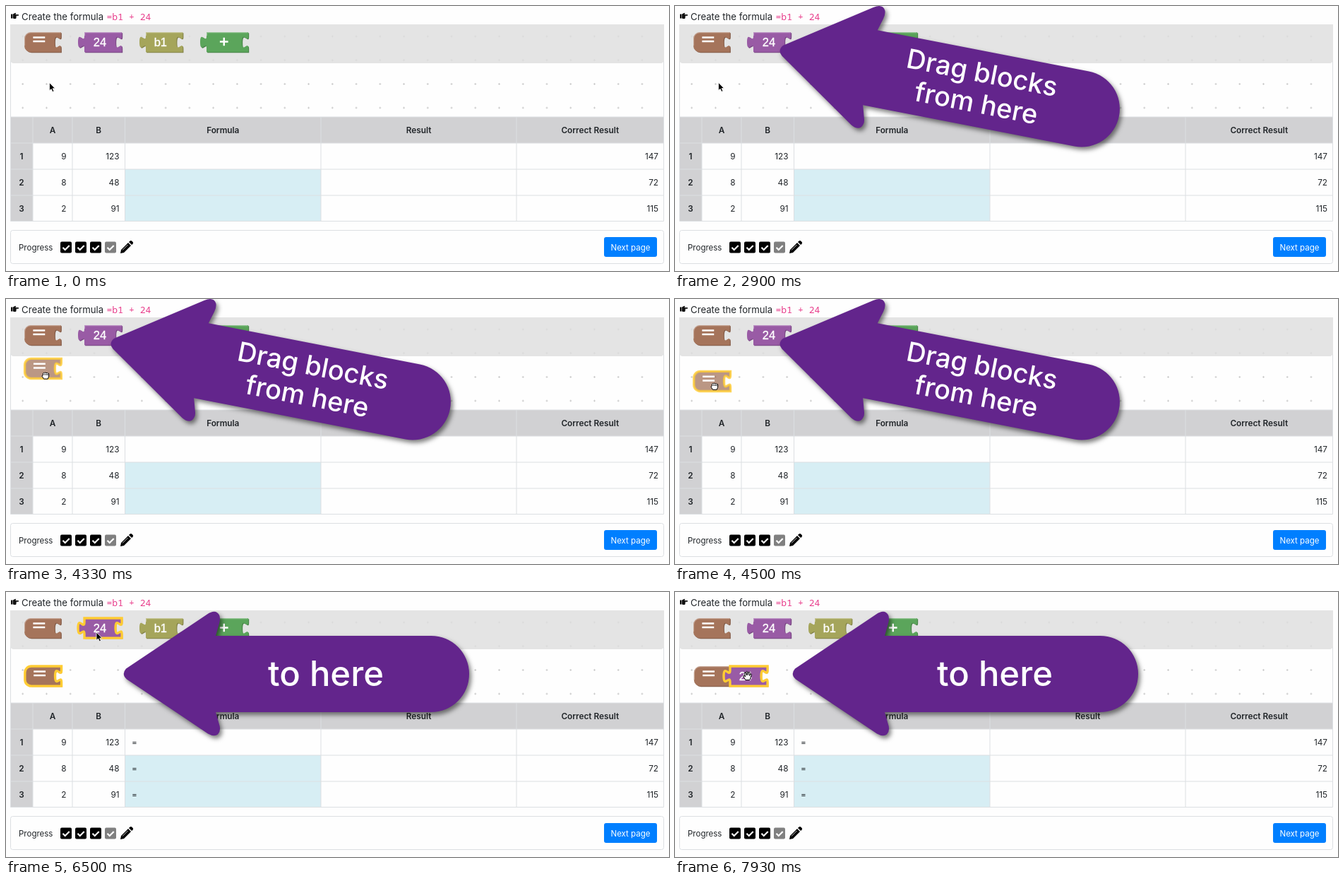
Recreate the animation shown at these times as an HTML page. Size 939 by 375 pixels, loop 8 s.

```html
<!DOCTYPE html>
<html lang="en">
<head>
<meta charset="utf-8">
<style>
  html, body { margin: 0; width: 100%; height: 100%; overflow: hidden; background: #fefefe; }
  svg { display: block; font: 11.8px Inter, sans-serif; fill: #212529; }
  .bold { font-weight: 600; }
  .mid { text-anchor: middle; }
  .end { text-anchor: end; }
  .line { fill: none; stroke: #dcdfe2; }
  .label { font: 14.67px "Liberation Sans", Arial, sans-serif; fill: #fff; stroke: #fff; stroke-width: .3; text-anchor: middle; }
  .glyph { stroke: #fff; stroke-width: 2.2; }
  .light { fill: none; stroke: #fff; stroke-opacity: .35; }
  .sel .face { stroke: #fc3; stroke-width: 3; }
  .sel .light, .drag .light, .drag .dark { display: none; }
  .drag .face { fill-opacity: .75; stroke-opacity: .8; }
  .arrow { filter: drop-shadow(3px 4px 3px rgba(0, 0, 0, .5)); }
  .arrow path { fill: #63258c; }
  .arrow text { fill: #fff; font-weight: 500; text-anchor: middle; }
  .hand { fill: #fff; stroke: #000; stroke-linejoin: round; }
</style>
</head>
<body>
<svg id="stage" width="939" height="375" viewBox="0 0 939 375"></svg>
<script>
const text = (x, y, content, cls = '', extra = '') =>
  `<text x="${x}" y="${y}" class="${cls}" ${extra}>${content}</text>`;
const rect = (x, y, w, h, fill, extra = '') =>
  `<rect x="${x}" y="${y}" width="${w}" height="${h}" fill="${fill}" ${extra}/>`;

// Puzzle blocks, in units of 1/1.125 px
const blocks = {
  equals: { x: 26, w: 46, fill: '#a5745b', dark: '#845d49', round: true,
    label: '<path class="glyph" d="M11 6.6h15M11 11.6h15"/>' },
  number: { x: 111, w: 47.2, fill: '#995ba5', dark: '#7a4984',
    label: text(19.5, 17.5, '24', 'label') },
  cell: { x: 198, w: 46.5, fill: '#a5a55b', dark: '#848449',
    label: text(18.5, 17.5, 'b1', 'label') },
  plus: { x: 284, w: 52.5, fill: '#5ba55b', dark: '#498449',
    label: '<path class="glyph" d="M16.8 12h10.4M22 6.8v10.4"/>' },
};

function block(name, id) {
  const { w, fill, dark, round, label } = blocks[name];
  const left = round
    ? 'H8 a8 8 0 0 1 -8 -8 V8 a8 8 0 0 1 8 -8 Z'
    : 'H0 V20 c0,-10 -8,8 -8,-7.5 s8,2.5 8,-7.5 Z';
  const d = `M${round ? 8 : 0},0 H${w} v5 c0,10 -8,-8 -8,7.5 s8,-2.5 8,7.5 V25 ${left}`;
  return `<g id="${id}"><path class="dark" d="${d}" fill="${dark}" transform="translate(1 1)"/>
    <path class="face" d="${d}" fill="${fill}"/>
    <path class="light" d="M.5 ${round ? 17 : 4.5} V${round ? 8 : .5} ${round ? 'a7.5 7.5 0 0 1 7.5 -7.5' : ''} H${w - .5}"/>
    ${label}</g>`;
}

// Pointer callout with its tip at the origin
const callout = (id, place, labels) => `<g id="${id}" class="arrow"><g transform="${place}">
  <path d="M3-7 L118-84 Q130-92 135-83 Q137-78 135-71 L130-53.5 H435 a54 54 0 0 1 0 108 H130
    L135 72 Q138 80 133 86 Q128 90 119 85 L4 8 Q-4 1 3-7Z"/>${labels}</g></g>`;

function table() {
  const cols = [6.5, 38, 94, 168.5, 446, 723, 931.5], rows = [157, 194, 231, 268, 304.5];
  const data = [[9, 123, 147], [8, 48, 72], [2, 91, 115]];
  let out = rect(6.5, 157, 925, 37, '#d1d1d3') + rect(6.5, 194, 31.5, 110.5, '#d1d1d3')
    + rect(168.5, 231, 277.5, 73.5, '#d7eef4');
  out += `<path class="line" d="${cols.map(x => `M${x} 157V304.5`).join('')}${rows.map(y => `M6.5 ${y}H931.5`).join('')}"/>`;
  ['A', 'B', 'Formula', 'Result', 'Correct Result'].forEach((name, i) =>
    out += text((cols[i + 1] + cols[i + 2]) / 2, 180, name, 'bold mid'));
  data.forEach((row, i) => {
    const y = 217.3 + 37 * i;
    out += text(22, y, i + 1, 'bold mid');
    row.forEach((value, j) => out += text([85.5, 160.5, 924][j], y, value, 'end'));
  });
  return out + `<g id="formulas">${data.map((_, i) => text(178, 217.3 + 37 * i, '=')).join('')}</g>`;
}

function footer() {
  let out = rect(6.5, 317.5, 925, 47, 'none', 'rx="3" stroke="#dcdfe2"')
    + text(18, 346, 'Progress', '', 'font-size="11.5"');
  for (let i = 0; i < 4; i++)
    out += `<g transform="translate(${77 + 21 * i} 333.5)">${rect(0, 0, 16, 16, i < 3 ? '#000' : '#808080', 'rx="2"')}
      <path d="M3.5 8.3l3.2 3.2 6-6" fill="none" stroke="#fff" stroke-width="2.2"/></g>`;
  return out + `<path d="M162 350l1-5 10-10 4 4-10 10zM174 334l1.5-1.5q1.5-1 2.8 0l1.3 1.4q1.2 1.4 0 2.7l-1.5 1.5z" fill="#000"/>
    <path d="M165 345.5l7.5-7.5" stroke="#fefefe" stroke-width=".8"/>`
    + rect(847, 327, 75, 28, '#007fff', 'rx="3"')
    + text(884.5, 345.5, 'Next page', 'mid', 'font-size="11.5" style="fill:#fff"');
}

let grid = '';
for (let y = 0; y < 4; y++)
  for (let x = 0; x < 27; x++)
    grid += `M${22.2 + 33.74 * x} ${43 + 33.7 * y}h3m-1.5-1.5v3`;

const palette = Object.keys(blocks).map(name => block(name, name)).join('');

document.getElementById('stage').innerHTML = `
  <path d="M7 11.5h2.5v6H7zM10 11.5l3-1.8 1.2.6-.8 1.6h4.2q1 .9 0 1.8h-3.2q1 .7.1 1.5.7.8-.2 1.5.4.8-.6 1.3H11l-1-.7z" fill="#111"/>
  ${text(22, 19.5, 'Create the formula', '', 'font-size="13.2"')}
  <text x="142.5" y="19.5" style="font:13.1px 'Noto Sans Mono',monospace;fill:#e83e8c">=b1 + 24</text>
  <path class="line" d="M6.5 26V157M931.5 26V157"/>
  <path d="M6 26H932V75q0 6-6 6H12q-6 0-6-6Z" fill="#e4e4e4"/>
  <path d="${grid}" stroke="#bbb" stroke-opacity=".75" stroke-width=".9"/>
  <path d="M6 26H932V75q0 6-6 6H12q-6 0-6-6Z" fill="#e4e4e4" fill-opacity=".7"/>
  ${table()}${footer()}${palette}
  ${block('equals', 'equalsCopy')}${block('number', 'numberCopy')}
  <g id="cursor">
    <path id="pointer" d="M0 0V11.3L2.6 9 4.4 13 6.4 12.1 4.7 8.2H8Z" fill="#000" stroke="#fff" stroke-width=".8"/>
    <path id="open" class="hand" d="M-2.5 9.5 L-5.5 5 q-.6-1.8 1-1.6 l1.7 1.5 -1.6-5 q.4-1.8 1.9-.7 l1.3 3.5 -.5-4.6 q1-1.5 2 0 l.4 4.4 1-4 q1.4-1 1.9.4 l-.6 4.6 1.3-2.4 q1.6-.6 1.5 1 l-1.5 4.9 -1 2.5Z"/>
    <path id="closed" class="hand" d="M-2.5 9.3 L-4.8 5.6 q-.3-2 1.6-1.8 l-.4-2.3 q.8-1.8 2.3-.5 .9-1.7 2.3 0 1.5-1.1 2.2.4 1.8-.5 1.7 1.3 l-.4 3.5 -1.3 3.1Z M-1 2v2M1.2 2v2M3.2 2.2v2"/>
  </g>
  ${callout('dragHint', 'translate(149 62) rotate(11)',
    text(287, -9.4, 'Drag blocks', '', 'font-size="38"') + text(287, 34.4, 'from here', '', 'font-size="38"'))}
  ${callout('dropHint', 'translate(167 115.5)', text(286, 17.5, 'to here', '', 'font-size="49"'))}`;

const $ = id => document.getElementById(id);
const show = (id, on) => $(id).style.display = on ? '' : 'none';
const mark = (id, cls, on) => $(id).classList.toggle(cls, on);
const place = (id, x, y) => $(id).setAttribute('transform', `translate(${x} ${y}) scale(1.125)`);

function ease(t, from, to) {
  const p = Math.min(1, Math.max(0, (t - from) / (to - from)));
  return p * p * (3 - 2 * p);
}

for (const name in blocks) place(name, blocks[name].x, 37);

const DRAG1 = 3860, DROP1 = 5200, DRAG2 = 6730, DROP2 = 7900, LAG = 33;
const carry1 = t => ease(t, DRAG1, 4550);
const carry2 = t => ease(t, DRAG2, 7530);

function cursorAt(t) {
  const mix = (a, b, p) => a.map((v, i) => v + (b[i] - v) * p);
  const rest = [61.5, 108.5], onEquals = [56, 52], dropped = [56, 120], onNumber = [128, 57];
  if (t < 2900) return mix(rest, onEquals, ease(t, 1400, 1900));
  if (t < DRAG1) return mix(rest, onEquals, ease(t, 2880, 3480));
  if (t < 5700) return mix(onEquals, dropped, carry1(t));
  if (t < DRAG2) return mix(dropped, onNumber, ease(t, 5700, 6480));
  return mix(onNumber, [102.5, 115], carry2(t));
}

function draw(t) {
  const [x, y] = cursorAt(t);
  const dragging1 = t >= DRAG1 && t < DROP1, dragging2 = t >= DRAG2 && t < DROP2;

  show('dragHint', t >= 330 && t < 4630);
  show('dropHint', t >= 4630);
  show('formulas', t >= DROP1);

  mark('equals', 'sel', t < DRAG1 && y < 65);
  mark('number', 'sel', t > 5700 && t < DRAG2 && x > 105 && y < 66);

  show('equalsCopy', t >= DRAG1);
  mark('equalsCopy', 'sel', t < DRAG2);
  mark('equalsCopy', 'drag', dragging1);
  place('equalsCopy', 26 + .8 * carry1(t - LAG), 37 + 68 * carry1(t - LAG));

  show('numberCopy', t >= DRAG2);
  mark('numberCopy', 'sel', true);
  mark('numberCopy', 'drag', dragging2);
  const p = carry2(t - LAG);
  if (t < DROP2) place('numberCopy', 111 - 25 * p, 37 + 59 * p);
  else place('numberCopy', 78, 105);

  const closed = dragging1 || dragging2;
  const open = !closed && (t >= DROP2 || t >= DROP1 && t < DRAG2 && y > 105);
  show('closed', closed);
  show('open', open);
  show('pointer', !closed && !open);
  $('cursor').setAttribute('transform', `translate(${x} ${y})`);
}

const start = performance.now();
function tick() {
  draw((performance.now() - start) % 8000);
  requestAnimationFrame(tick);
}
tick();
</script>
</body>
</html>
```
